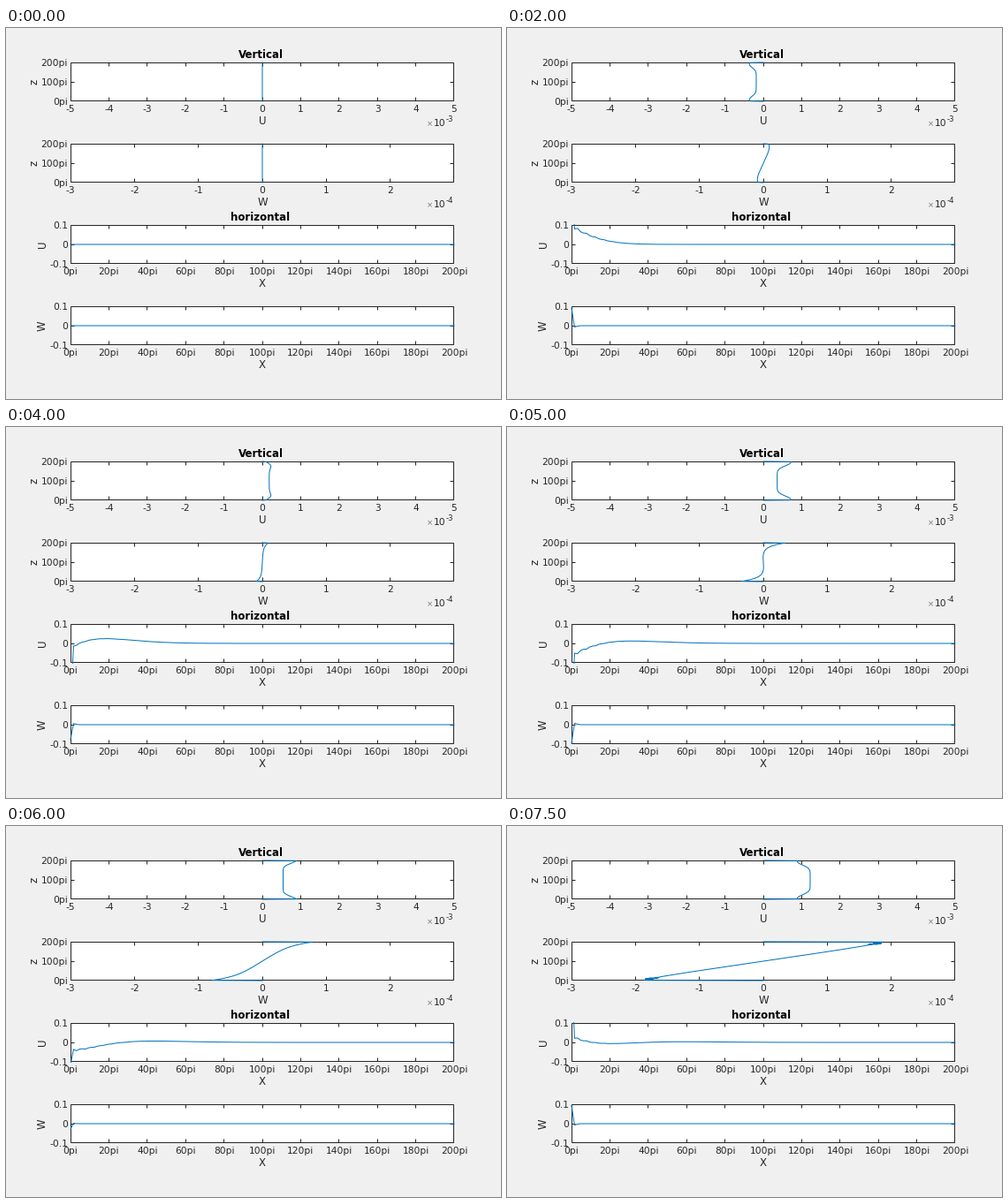
A matplotlib script for the animation above (8000 ms loop, 560 px wide and 420 px high).

```python
import numpy as np
import matplotlib.pyplot as plt
from matplotlib.animation import FuncAnimation
from matplotlib.patches import Rectangle

W, H, DPI = 560, 420, 100
INK, BLUE = "#262626", "#0072BD"
PX = 72 / DPI                      # points per pixel
TICK, LABEL = 10.65, 11.7          # font sizes in pixels
LEFT, RIGHT, MID, TALL = 73, 507, 290, 44
TOPS = 39, 131, 223, 315
STEPS, CELLS = 16, 128

plt.rcParams["font.family"] = "DejaVu Sans"
fig = plt.figure(figsize=(W / DPI, H / DPI), dpi=DPI, facecolor="#F0F0F0")
ax = fig.add_axes([0, 0, 1, 1])
ax.set(xlim=(0, W), ylim=(H, 0))
ax.axis("off")


def text(x, y, s, size=TICK, ha="center", va="baseline", color=INK, **kw):
    ax.text(x, y, s, fontsize=size * PX, ha=ha, va=va, color=color, **kw)


def stroke(xs, ys):
    ax.plot(xs, ys, color=INK, lw=PX, snap=False, solid_capstyle="butt")


def panel(top, xticks, yticks, xlabel, ylabel, ylabel_x, title=None, power=None):
    """Draw one boxed plot and return its empty curve."""
    bottom = top + TALL
    x0, x1, y0, y1 = LEFT + 0.5, RIGHT - 0.5, top + 0.5, bottom - 0.5
    ax.add_patch(Rectangle((x0, y0), x1 - x0, y1 - y0, fc="white", ec=INK,
                           lw=PX, snap=False))
    for i, s in enumerate(xticks):
        x = LEFT + (RIGHT - LEFT) * i / (len(xticks) - 1)
        text(x, bottom + 12, s)
        if 0 < i < len(xticks) - 1:
            c = np.floor(x) + 0.5
            stroke([c, c], [y0, y0 + 4])
            stroke([c, c], [y1 - 4, y1])
    for i, s in enumerate(yticks):
        text(70, bottom - TALL * i / 2 + 4, s, ha="right")
    ym = top + TALL / 2 + 0.5
    stroke([x0, x0 + 4], [ym, ym])
    stroke([x1 - 4, x1], [ym, ym])

    text(MID, bottom + 26.2, xlabel, LABEL)
    text(ylabel_x, top + TALL / 2, ylabel, LABEL, va="center", rotation=90)
    if title:
        text(MID - 2, top - 5, title, LABEL, color="black", weight="bold")
    if power:
        text(475.7, bottom + 28, "×", 8.5, ha="left", color="#777777")
        text(484, bottom + 28, "10", ha="left")
        text(497.6, bottom + 23, power, 8.5, ha="left")

    line, = ax.plot([], [], color=BLUE, lw=PX, snap=False, zorder=5)
    line.set_clip_path(Rectangle((LEFT - 1, top - 1), RIGHT - LEFT + 2,
                                 TALL + 2, transform=ax.transData))
    return line


pis = [f"{20 * i}pi" for i in range(11)]
heights = ["0pi", "100pi", "200pi"]
levels = ["-0.1", "0", "0.1"]
u_z = panel(TOPS[0], [str(i) for i in range(-5, 6)], heights, "U", "z", 32,
            "Vertical", "-3")
w_z = panel(TOPS[1], [str(i) for i in range(-3, 3)] + [""], heights, "W", "z",
            32, power="-4")
u_x = panel(TOPS[2], pis, levels, "X", "U", 41.3, "horizontal")
w_x = panel(TOPS[3], pis, levels, "X", "W", 41.3)

cell = np.arange(CELLS + 1)
dist = (RIGHT - LEFT) * cell / CELLS                   # from the left edge
depth = np.linspace(0, TALL / 2, CELLS // 2 + 1)       # from the nearer wall
both = np.concatenate([depth, TALL - depth[::-1]])
zigzag = 6 * (-1) ** np.arange(len(depth)) * np.exp(-((depth - 2.3) / 1.1) ** 2)


def u_depth(n):
    """Drifting core with a swinging layer at the walls."""
    core = np.interp(n, [0, 4, 12, 15], [0, -8, 23.5, 53])
    swing = 19 * (1 - np.exp(-n / 3)) * np.sin(0.6 * (n - 8.4) + 0.09 * depth)
    u = core + swing * np.exp(-(depth / 6) ** 2)
    u[0] = 0
    return u


def w_depth(n):
    """Straight slope plus a wall layer, with late grid noise."""
    slope = np.interp(n, [0, 1, 6, 8, 10, 12, 15], [0, 5, 14, 1, -2, 35, 150])
    layer = 30 * min(1, n / 10) ** 2 * np.sin(0.47 * (n - 7.3))
    w = (1 - 2 * depth / TALL) * (slope + layer * np.exp(-depth / 5))
    w += zigzag * np.clip((n - 13) / 2, 0, 1)
    w[0] = 0
    return w


def u_along(n, nu=270):
    """Diffusion from rest, driven by a fading swing at the left edge."""
    s = (np.arange(400) + 0.5) / 100
    t = n - dist[:, None] ** 2 / (4 * nu * s ** 2)
    drive = np.where(t > 1, 26 * np.sin((t - 1) / 2) * np.exp(-t / 16), 0)
    u = 2 / np.sqrt(np.pi) * (drive * np.exp(-s ** 2)).sum(axis=1) / 100
    if n:
        ripple = np.cos(2 * np.pi * (cell - 2) / 3) * np.exp(-cell / 5)
        u += 2.2 * np.sin((n - 1) / 2) * ripple
    u[0] = 90 * np.sin(n / 2)
    return u


def w_along(n):
    w = np.zeros(CELLS + 1)
    w[:3] = np.array([22, -1.6, -0.6]) * np.sin(n / 2)
    return w


def draw(n):
    u, w = u_depth(n), w_depth(n)
    u_z.set_data(MID + np.concatenate([u, u[::-1]]), TOPS[0] + both)
    w_z.set_data(MID + np.concatenate([w, -w[::-1]]), TOPS[1] + both)
    u_x.set_data(LEFT + dist, TOPS[2] + TALL / 2 - u_along(n))
    w_x.set_data(LEFT + dist, TOPS[3] + TALL / 2 - w_along(n))
    return u_z, w_z, u_x, w_x


anim = FuncAnimation(fig, draw, frames=STEPS, interval=500, repeat=True)
plt.show()
```
